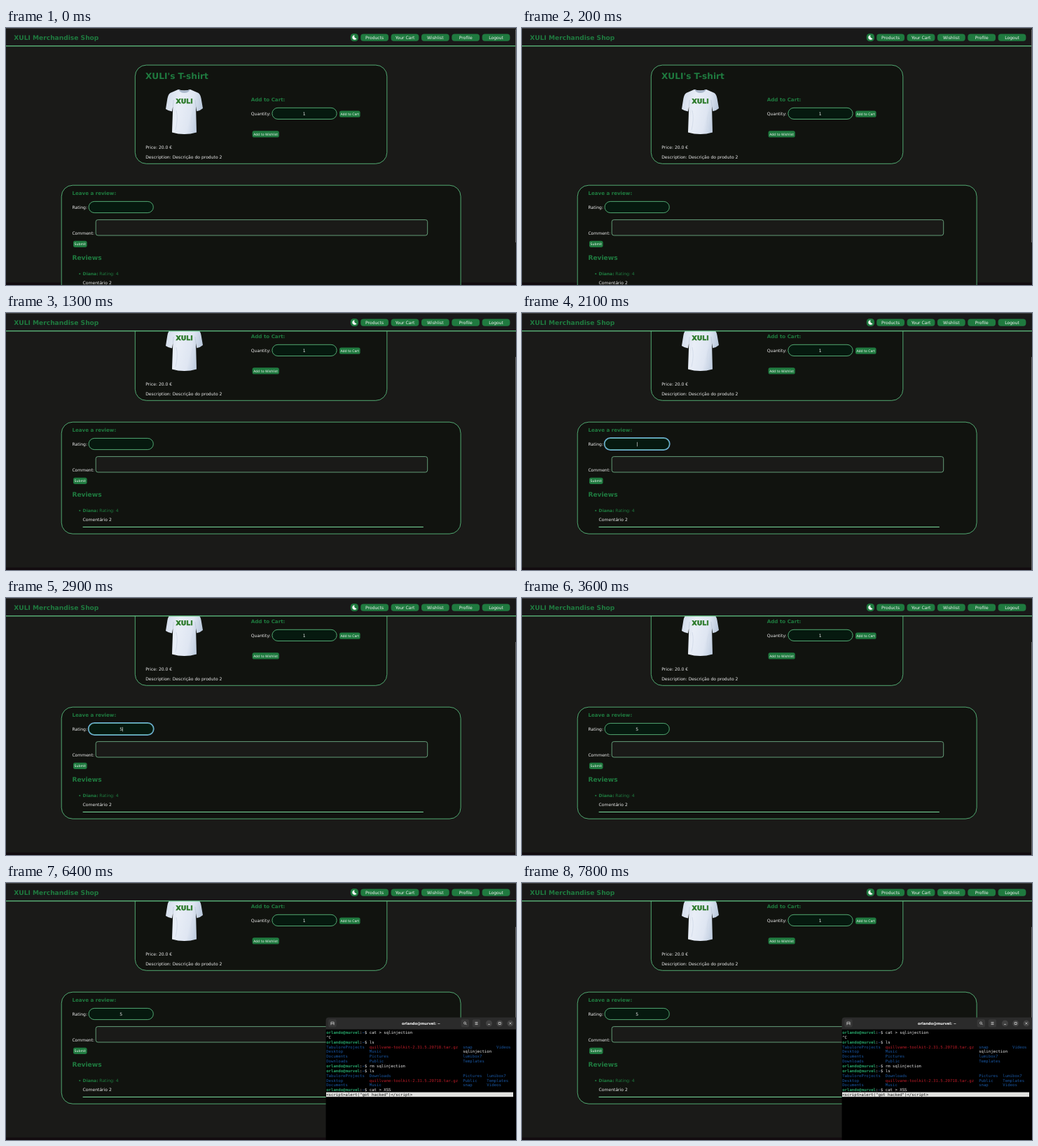
An HTML page for the animation above (8000 ms loop, 728x368 px).

```html
<!DOCTYPE html>
<html lang="en">
<head>
<meta charset="utf-8">
<title>Shop review page</title>
<style>
  html, body { margin: 0; width: 100%; height: 100%; overflow: hidden; background: #1a1a18; }
  svg { display: block; width: 728px; height: 368px; font-family: "DejaVu Sans", sans-serif; text-rendering: geometricPrecision; }
  .mono { font-family: "DejaVu Sans Mono", monospace; }
</style>
</head>
<body>
<svg id="stage" viewBox="0 0 728 368" xmlns="http://www.w3.org/2000/svg">
  <defs>
    <clipPath id="view"><rect y="26" width="728" height="342"/></clipPath>
    <linearGradient id="cloth" x1="0" x2="1" y1="0" y2="0.25">
      <stop offset="0" stop-color="#cfd9e8"/>
      <stop offset="0.4" stop-color="#e9eef7"/>
      <stop offset="0.75" stop-color="#dfe6f2"/>
      <stop offset="1" stop-color="#bccadd"/>
    </linearGradient>
  </defs>
  <rect width="728" height="368" fill="#1a1a18"/>
  <rect y="364.5" width="728" height="3.5" fill="#120b0f"/>
  <g clip-path="url(#view)"><g id="page"></g></g>
  <g id="header"></g>
  <rect id="thumb" x="727" y="2" width="1" height="305" fill="#666"/>
  <g id="terminal"></g>
</svg>
<script>
const LOOP = 8000;
const GREEN = '#1f7a3f', LINE = '#58b87c', WHITE = '#ececec', FIELD = '#06190f';
const BODY = 6.07, H1 = 12.13, H2 = 9.1, H3 = 7.1, SMALL = 4.7;
const $ = id => document.getElementById(id);

function add(parent, tag, attrs, content) {
  const node = document.createElementNS('http://www.w3.org/2000/svg', tag);
  for (const key in attrs) node.setAttribute(key, attrs[key]);
  if (content !== undefined) node.textContent = content;
  parent.appendChild(node);
  return node;
}

const group = parent => add(parent, 'g', {});

const box = (parent, x, y, width, height, rx, fill, more) =>
  add(parent, 'rect', { x, y, width, height, rx, fill, ...more });

const label = (parent, x, y, size, fill, content, more) =>
  add(parent, 'text', { x, y, 'font-size': size, fill, ...more }, content);

const path = (parent, d, stroke, width = 0.7) =>
  add(parent, 'path', { d, stroke, fill: 'none', 'stroke-width': width });

const BOLD = { 'font-weight': 700 };
const MIDDLE = { 'text-anchor': 'middle' };

function button(parent, x, y, w, h, rx, size, content) {
  box(parent, x, y, w, h, rx, GREEN);
  label(parent, x + w / 2, y + h / 2 + size * 0.35, size, '#f2f2f2', content, MIDDLE);
}

const outline = (parent, x, y, w, h, rx, fill, stroke = LINE) =>
  box(parent, x, y, w, h, rx, fill, { stroke, 'stroke-width': 0.9 });

function drawShirt(parent) {
  add(parent, 'path', {
    fill: 'url(#cloth)',
    d: 'M246 88 Q254.5 91 263 88 L274.5 93 Q277.5 95 278.6 101 L281 115 Q277 118.6 272.3 119.2 L271 112 ' +
       'L272 149.5 Q254.5 154.5 237 149.5 L238.3 112 L237 119.4 Q232 119 228 116 L230.4 101 Q231.5 95 234.5 93 Z'
  });
  add(parent, 'path', { fill: '#aab8cc', d: 'M246 88 Q254.5 91 263 88 Q260.5 93 254.5 93 Q248.5 93 246 88 Z' });
  path(parent, 'M238.3 112 L239.2 103 M271 112 L270 103', '#b4c1d4', 0.6);
  path(parent, 'M242 146 Q246 130 243 118 M266 147 Q262 134 267 120', '#d2dbe9', 0.9);
  label(parent, 254.7, 107.8, 9.4, '#2c7a2a', 'XULI', { ...BOLD, ...MIDDLE, stroke: '#2c7a2a', 'stroke-width': 0.5 });
}

function drawPage(page) {
  outline(page, 184.3, 53.1, 359.5, 141.2, 16, '#11130f');
  label(page, 199, 72.7, H1, GREEN, "XULI's T-shirt", BOLD);
  drawShirt(page);
  label(page, 199.2, 173.2, BODY, WHITE, 'Price: 20.0 €');
  label(page, 199.2, 186.5, BODY, WHITE, 'Description: Descrição do produto 2');
  label(page, 349.8, 104.7, H3, GREEN, 'Add to Cart:', BOLD);
  label(page, 349.8, 125.1, BODY, WHITE, 'Quantity:');
  outline(page, 379.9, 114.3, 92.2, 16.2, 8.1, FIELD);
  label(page, 425.6, 124.7, BODY, WHITE, '1', MIDDLE);
  button(page, 476, 118.6, 29.6, 9.2, 2.6, SMALL, 'Add to Cart');
  button(page, 351.6, 147.3, 38.2, 9.2, 2.6, SMALL, 'Add to Wishlist');

  outline(page, 79.2, 225.2, 569.9, 160, 16, '#11130f');
  label(page, 94.4, 239.4, H3, GREEN, 'Leave a review:', BOLD);
  label(page, 94.4, 259.1, BODY, WHITE, 'Rating:');
  outline(page, 118.1, 248.4, 92.2, 16.2, 8.1, FIELD);
  label(page, 94.4, 296, BODY, WHITE, 'Comment:');
  outline(page, 128.2, 274.6, 473.5, 22.4, 3, '#1a1a18', '#6cab83');
  button(page, 96, 304.7, 19.6, 9.2, 2.6, SMALL, 'Submit');
  label(page, 94.4, 332.4, H2, GREEN, 'Reviews', BOLD);
  add(page, 'circle', { cx: 105.3, cy: 352, r: 1.1, fill: GREEN });
  label(page, 109.6, 354.1, BODY, GREEN, 'Diana:', BOLD);
  label(page, 133.3, 354.1, BODY, GREEN, 'Rating: 4');
  label(page, 109.6, 367.3, BODY, WHITE, 'Comentário 2');
  box(page, 109.6, 374.9, 486.2, 1.1, 0, '#74cf95');

  const ring = box(page, 117.5, 247.8, 93.4, 17.4, 8.7, 'none', { stroke: '#6aa9d0', 'stroke-width': 1.5 });
  const rating = label(page, 164.3, 259, BODY, WHITE, '5', MIDDLE);
  const caret = box(page, 166.2, 253.8, 0.6, 6.4, 0, WHITE);
  return { ring, rating, caret };
}

function drawHeader(header) {
  box(header, 0, 0, 728, 26, 0, '#191919');
  box(header, 0, 0, 728, 1, 0, '#3b3b3b');
  box(header, 0, 25.1, 728, 1.3, 0, '#5fbf80');
  label(header, 11.3, 16.9, H2, GREEN, 'XULI Merchandise Shop', BOLD);
  box(header, 491.8, 8, 11.2, 11, 4.6, GREEN);
  add(header, 'path', { fill: '#fff', d: 'M497.6 10.2 A3.3 3.3 0 1 0 500.6 14.9 A3.1 3.1 0 0 1 497.6 10.2 Z' });
  ['Products', 'Your Cart', 'Wishlist', 'Profile', 'Logout'].forEach((name, i) =>
    button(header, 506.3 + i * 43.35, 8.5, 39.7, 10.2, 4, BODY, name));
}

const CELL = 3.42, ROW = 6.85, LEFT = 457.2;
const BLUE = '#1957a3', RED = '#c01c28', PROMPT = '#26a269';
const ARCHIVE = 'quillvane-toolkit-2.31.5.20718.tar.gz';
// Each row is a "$ command", plain text, or a list of [column, name].
const ROWS = [
  '$ cat > sqlinjection',
  '^C',
  '$ ls',
  [[0, 'TabuloreProjects'], [18, ARCHIVE], [57, 'snap'], [71, 'Videos']],
  [[0, 'Desktop'], [18, 'Music'], [57, 'sqlinjection']],
  [[0, 'Documents'], [18, 'Pictures'], [57, 'lumibox7']],
  [[0, 'Downloads'], [18, 'Public'], [57, 'Templates']],
  '$ rm sqlinjection',
  '$ ls',
  [[0, 'TabuloreProjects'], [18, 'Downloads'], [57, 'Pictures'], [67, 'lumibox7']],
  [[0, 'Desktop'], [18, ARCHIVE], [57, 'Public'], [67, 'Templates']],
  [[0, 'Documents'], [18, 'Music'], [57, 'snap'], [67, 'Videos']],
  '$ cat > XSS'
];

function drawTerminal(term) {
  add(term, 'path', { fill: '#2b2b2b', d: 'M456.6 211 V196.5 Q456.6 192.5 460.6 192.5 H728 V211 Z' });
  box(term, 456.6, 209.6, 271.4, 158.4, 0, '#000');
  for (const x of [460.3, 649.7, 665.8]) box(term, x, 195.3, 11.3, 11.3, 2, '#383838');
  path(term, 'M463.9 203.4 V199.2 H468.1 V203.4 M463.9 201.4 H468.1', '#ddd');
  add(term, 'circle', { cx: 655, cy: 200.5, r: 1.5, fill: 'none', stroke: '#ddd', 'stroke-width': 0.7 });
  path(term, 'M656.1 201.6 L657.6 203.1', '#ddd', 0.8);
  path(term, 'M669.5 199.4 H673.5 M669.5 201 H673.5 M669.5 202.6 H673.5', '#ddd');

  const discs = group(term);
  for (const cx of [689.5, 704.7, 719.9]) add(discs, 'circle', { cx, cy: 201, r: 4.6, fill: '#414141' });
  path(term, 'M688 202.4 H691 M703.2 199.5 H706.2 V202.5 H703.2 Z M718.4 199.5 L721.4 202.5 M721.4 199.5 L718.4 202.5', '#ddd');
  const title = label(term, 592.5, 202.9, 5.1, '#ddd', 'orlando@murvel: ~', { ...BOLD, ...MIDDLE });

  const lines = add(term, 'g', { class: 'mono' });
  const put = (col, row, fill, content, more) =>
    label(lines, LEFT + col * CELL, 216 + row * ROW, CELL / 0.602, fill, content, more);

  ROWS.forEach((line, row) => {
    if (Array.isArray(line)) {
      for (const [col, name] of line) {
        const plain = name === 'sqlinjection';
        put(col, row, plain ? WHITE : name === ARCHIVE ? RED : BLUE, name);
      }
    } else if (line[0] === '$') {
      put(0, row, PROMPT, 'orlando@murvel', BOLD);
      put(14, row, WHITE, ':');
      put(15, row, BLUE, '~', BOLD);
      put(16, row, WHITE, line);
    } else put(0, row, WHITE, line);
  });

  box(lines, 457, 299.6, 267, 6.6, 0, '#e2e2e0');
  put(0, 13, '#111', '<script>alert("got hacked")<\/script>');
  const cursor = box(lines, LEFT + 36 * CELL, 299.6, CELL, 6.6, 0, '#000');
  return { discs, title, cursor };
}

const form = drawPage($('page'));
drawHeader($('header'));
const term = drawTerminal($('terminal'));

const show = (node, on) => node.setAttribute('visibility', on ? 'inherit' : 'hidden');
const within = (t, from, to) => t >= from && t < to;

function render(t) {
  const scroll = t < 1200 ? 0 : t < 1300 ? 29 : 69;
  $('page').setAttribute('transform', `translate(0 ${-scroll})`);
  $('thumb').setAttribute('y', 2 + scroll * 61 / 69);

  const focused = within(t, 2100, 3600);
  const typed = t >= 2900;
  show(form.ring, focused);
  show(form.caret, focused);
  form.caret.setAttribute('x', typed ? 166.2 : 164);
  show(form.rating, typed);

  const active = t >= 5300;
  show($('terminal'), t >= 5200);
  show(term.discs, active);
  term.title.setAttribute('fill', active ? '#fff' : '#ccc');
  show(term.cursor, within(t, 5200, 5300) || within(t, 5700, 6400) || within(t, 7000, 7700));
}

function tick() {
  render(performance.now() % LOOP);
  requestAnimationFrame(tick);
}
tick();
</script>
</body>
</html>
```
